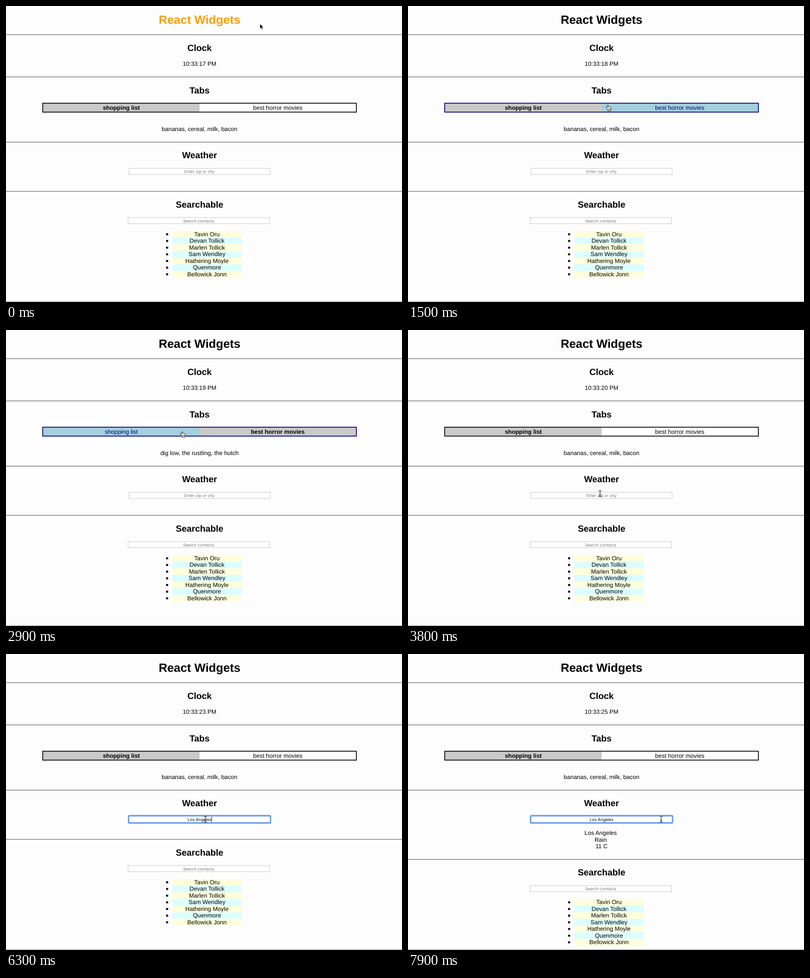
Recreate the animation shown at these times as an HTML page. Size 800 by 599 pixels, loop 8 s.

```html
<!DOCTYPE html>
<html lang="en">
<head>
<meta charset="utf-8">
<title>React Widgets</title>
<style>
  html, body { margin: 0; width: 100%; height: 100%; overflow: hidden; background: #fefdfe; }
  svg { display: block; width: 100vw; height: 100vh; }
  text { font: 12px Arial, "Liberation Sans", sans-serif; text-anchor: middle; text-rendering: geometricPrecision; }
  .h1 { font-size: 24px; font-weight: bold; }
  .h2 { font-size: 18px; font-weight: bold; }
  .field { font: 8.25px Inter, sans-serif; }
  .hint { fill: #757575; }
  .rule { fill: #4c4c4c; }
  .box { fill: #fff; stroke: #c9c9c9; }
  .h1.hover { fill: #fa9f08; }
  .tab rect { fill: #fff; }
  .tab.on rect { fill: #cac9ca; }
  .tab.on text { font-weight: bold; }
  .tab.hover rect { fill: #a3cfdf; }
  .tab.hover text { fill: #00007c; }
  #frame { fill: none; stroke: #111; stroke-width: 1.8; }
  #frame.hover { stroke: #0a0a80; }
  #ring rect { fill: none; stroke: #5c95ee; stroke-width: 2.2; }
  #ring rect:first-child { stroke: #b9d3fa; stroke-width: 3.4; }
</style>
</head>
<body>
<svg viewBox="0 0 800 599">
  <rect width="800" height="599" fill="#fefdfe"/>
  <text id="title" class="h1" x="391" y="36">React Widgets</text>
  <rect class="rule" y="57.5" width="800" height="1"/>

  <text class="h2" x="391" y="91">Clock</text>
  <text id="clock" x="391" y="121"></text>
  <rect class="rule" y="143" width="800" height="1"/>

  <text class="h2" x="391" y="176.5">Tabs</text>
  <g class="tab"><rect x="74" y="197" width="317" height="18"/><text x="233" y="209.5">shopping list</text></g>
  <g class="tab"><rect x="391" y="197" width="317" height="18"/><text x="549" y="209.5">best horror movies</text></g>
  <rect id="frame" x="74.2" y="196.7" width="633.6" height="18"/>
  <text id="content" x="391" y="253"></text>
  <rect class="rule" y="275" width="800" height="1"/>

  <text class="h2" x="391" y="307.5">Weather</text>
  <rect class="box" x="248.5" y="328.5" width="285" height="12.5"/>
  <g id="ring">
    <rect x="247.5" y="327" width="287" height="15" rx="1.5"/>
    <rect x="247.8" y="327.4" width="286.4" height="14.4" rx="1"/>
  </g>
  <text id="city" class="field" x="391" y="338"></text>
  <rect id="caret" y="329.5" width="0.9" height="10.5"/>
  <g id="report">
    <text x="389.3" y="366">Los Angeles</text>
    <text x="389.3" y="379.5">Rain</text>
    <text x="391" y="393">11 C</text>
  </g>

  <g id="lower">
    <rect class="rule" y="374.6" width="800" height="1"/>
    <text class="h2" x="391" y="407.5">Searchable</text>
    <rect class="box" x="246.5" y="428.3" width="286" height="12.2"/>
    <text class="field hint" x="389.3" y="437.6">Search contacts</text>
    <g id="list"></g>
  </g>
  <rect fill="#8a8a8a" y="598" width="800" height="1"/>

  <circle id="press" r="23" fill="none" stroke="#111" stroke-width="1.3"/>
  <path id="arrow" d="M0 0V10.2L2.4 8L4 11.8L5.8 11L4.2 7.4H7.3Z" fill="#000" stroke="#fff" stroke-width=".7"/>
  <g id="hand" stroke="#111" stroke-width=".9" stroke-linejoin="round" stroke-linecap="round">
    <path fill="#fff" d="M-1.5 8.2L-3.5 5.7Q-4 4.5-2.8 4.4L-1.3 5.8V1Q-.3-.4.7 1V4Q1.7 3.1 2.6 4.3Q3.7 3.6 4.5 4.8Q6 4.4 6.3 5.9V8.4L5.2 10.7V12.3H-.2V10.8Z"/>
    <path fill="none" stroke-width=".7" d="M1.2 7.5V10M2.9 7.5V10M4.5 7.5V10"/>
  </g>
  <g id="beam" fill="none" stroke-linecap="round">
    <path stroke="#fff" stroke-width="2" d="M0-5V5"/>
    <path stroke="#222" stroke-width="1.1" d="M-2.8-6Q-.2-6 0-4.6Q.2-6 2.8-6M0-4.6V4.6M-2.8 6Q-.2 6 0 4.6Q.2 6 2.8 6M-1.4 2.2H1.4"/>
  </g>
</svg>
<script>
const LOOP = 8000, STEP = 100;
const $ = id => document.getElementById(id);
const tabs = document.querySelectorAll('.tab');
const contacts = ['Tavin Oru', 'Devan Tollick', 'Marlen Tollick', 'Sam Wendley',
  'Hathering Moyle', 'Quenmore', 'Bellowick Jonn'];
const contents = ['bananas, cereal, milk, bacon', 'dig low, the rustling, the hutch'];
const city = 'Los Angeles';

const ticks = [900, 1900, 3000, 4000, 4900, 5900, 7400, 7900];
const keys = [4700, 4900, 5000, 5100, 5300, 5400, 5500, 5700, 5800, 5900, 6100];
const presses = [[2400, 2600], [3000, 3200], [3900, 4000]];
// time, x, y of the pointer
const path = [
  [0, 513, 36], [300, 513.5, 36], [700, 492, 75], [1300, 412, 198], [1500, 404, 200],
  [2100, 409.5, 206], [2600, 409.5, 206], [2900, 356, 205], [3200, 356, 205],
  [3800, 388, 331], [4100, 389.5, 332], [6200, 389.5, 332], [6800, 569.5, 364],
  [7300, 569.5, 364], [7900, 511.5, 334]
];

$('list').innerHTML = contacts.map((name, i) => {
  const y = 455 + i * 13.5;
  return `<rect x="335.5" y="${y}" width="141" height="13.5" fill="${i % 2 ? '#dcfdfe' : '#fefedc'}"/>
    <rect x="323.5" y="${y + 5}" width="4" height="4"/>
    <text x="406" y="${y + 10.6}">${name}</text>`;
}).join('');

const count = (times, t) => times.filter(k => t >= k).length;
const between = (t, a, b) => t >= a && t < b;
const show = (id, on) => $(id).setAttribute('visibility', on ? 'visible' : 'hidden');
const move = (el, x, y) => el.setAttribute('transform', `translate(${x} ${y})`);

function pointer(t) {
  const i = path.findIndex(p => p[0] > t);
  if (i < 0) return path[path.length - 1].slice(1);
  const [t0, x0, y0] = path[i - 1], [t1, x1, y1] = path[i];
  const u = (t - t0) / (t1 - t0), e = u * u * (3 - 2 * u);
  return [x0 + (x1 - x0) * e, y0 + (y1 - y0) * e];
}

function draw(t) {
  const [x, y] = pointer(t);
  const overTabs = between(x, 73, 709) && between(y, 196, 216);
  const overField = between(x, 247, 535) && between(y, 327, 342);
  const active = between(t, 2600, 3200) ? 1 : 0;
  const typed = city.slice(0, count(keys, t));
  const loaded = t >= 7600;

  $('title').classList.toggle('hover', y < 58);
  $('clock').textContent = `10:33:${17 + count(ticks, t)} PM`;

  $('frame').classList.toggle('hover', overTabs);
  tabs.forEach((tab, i) => {
    tab.classList.toggle('on', i === active);
    tab.classList.toggle('hover', i !== active && overTabs);
  });
  $('content').textContent = contents[active];

  show('ring', t >= 4000);
  $('city').textContent = typed || 'Enter zip or city';
  $('city').classList.toggle('hint', !typed);
  const width = typed ? $('city').getComputedTextLength() : 0;
  $('caret').setAttribute('x', 391 + width / 2);
  show('caret', between(t, 4000, 4400) || between(t, 4700, 6700));
  show('report', loaded);
  move($('lower'), 0, loaded ? 40.5 : 0);

  const kind = overTabs ? 'hand' : overField ? 'beam' : 'arrow';
  for (const id of ['arrow', 'hand', 'beam']) show(id, id === kind);
  move($(kind), x, y);
  move($('press'), x, y);
  show('press', presses.some(([a, b]) => between(t, a, b)));
}

function tick(now) {
  draw(Math.floor(now % LOOP / STEP) * STEP);
  requestAnimationFrame(tick);
}
draw(0);
requestAnimationFrame(tick);
</script>
</body>
</html>
```
